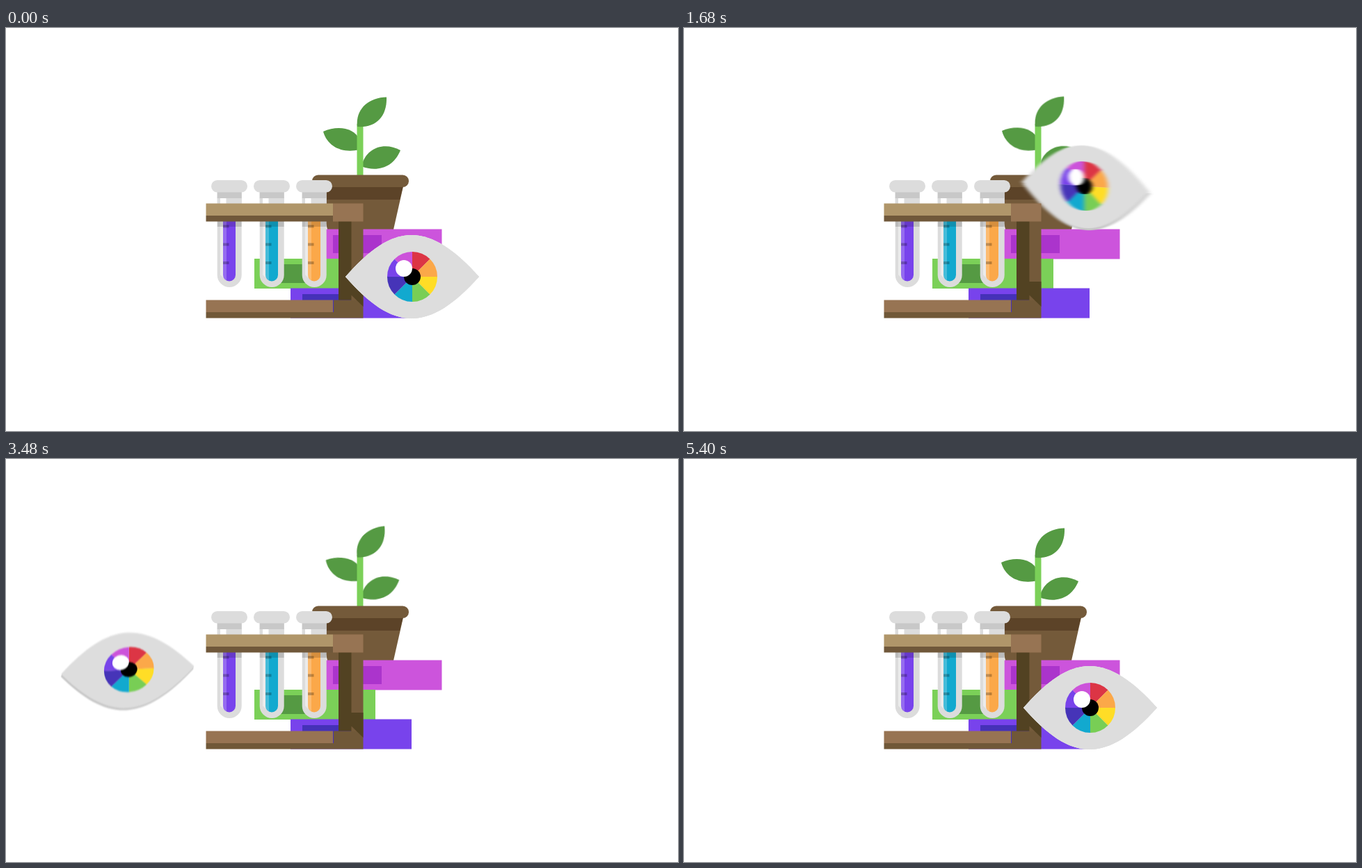
An HTML page that plays this animation: 966x580 px, repeating every 5440 ms.

```html
<!DOCTYPE html>
<html lang="en">
<head>
<meta charset="utf-8">
<title>Eye orbiting a still life</title>
<style>
  html, body { margin: 0; width: 100%; height: 100%; overflow: hidden; background: #fff; }
  svg { display: block; width: 966px; height: 580px; }

  .leaf { animation: sway 5440ms infinite cubic-bezier(.4, 0, .6, 1); }
  .top { --a: -4deg; transform-origin: 500px 142px; }
  .left { --a: 4.3deg; transform-origin: 508px 200px; }
  .right { --a: -2.3deg; transform-origin: 515px 222px; }
  @keyframes sway {
    0%, 16.5% { transform: none; }
    57% { transform: rotate(var(--a)); }
    97%, 100% { transform: none; }
  }

  .tube { transform-origin: 321px 336px; animation: nudge 5440ms infinite ease-in-out; }
  @keyframes nudge {
    0%, 34.6% { transform: none; }
    38.2% { transform: rotate(1.6deg); }
    42.3% { transform: rotate(-.6deg); }
    45.5%, 100% { transform: none; }
  }
</style>
</head>
<body>
<svg id="scene" viewBox="0 0 966 580">
  <defs>
    <filter id="motion" filterUnits="userSpaceOnUse" x="0" y="0" width="966" height="580"
            color-interpolation-filters="sRGB">
      <feGaussianBlur id="blur" stdDeviation="0 0"/>
    </filter>
    <path id="lens" d="M-96 0C-62 -39 -32 -60 -1 -60S61 -39 96 0C61 39 30 60 -1 60S-62 39 -96 0Z"/>
  </defs>

  <g fill="#559a43">
    <path class="leaf left" d="M456 149C476 140 500 143 508 160V175C484 181 462 171 456 149Z"/>
    <path class="leaf right" d="M511 199C517 172 544 163 567 176C557 201 533 208 511 199Z"/>
  </g>
  <path fill="#7bd058" d="M504.500 138h9v76h-9z"/>
  <path class="leaf top" fill="#559a43" d="M505 142C502 117 521 100 547 99.500C548 126 533 144 505 142Z"/>

  <path fill="#745a3a" d="M448 228H571L557 290H462Z"/>
  <path fill="#5c4328" d="M448 229H570.500L566 247H452Z"/>
  <rect x="440" y="211.500" width="139" height="17.500" rx="8.700" fill="#745a3a"/>

  <path fill="#cc54dc" d="M460 289.500H626.500V332.500H460Z"/>
  <path fill="#ab34cc" d="M470 298H540V324H470Z"/>
  <path fill="#7bd058" d="M357 332H531V375H357Z"/>
  <path fill="#559a43" d="M383 340H436V367H383Z"/>
  <path fill="#7843ec" d="M409 374.500H583V417.500H409Z"/>
  <path fill="#4531b8" d="M426 383H496V409H426Z"/>

  <g id="rack">
    <g id="tubes"></g>
    <path fill="#b0966a" d="M287.500 252.500H470V270H287.500Z"/>
    <path fill="#70583a" d="M287.500 270H471V278.500H287.500Z"/>
    <path fill="#705838" d="M287.500 409H471V391.500H513.500V417.500H287.500Z"/>
    <path fill="#977453" d="M287.500 391.500H470V409H287.500Z"/>
    <path fill="#745a3a" d="M496 278H513.500V392H496Z"/>
    <path fill="#524222" d="M478 278H496.500V391.500H478ZM496 365H513.500V401L496 384Z"/>
    <path fill="#977453" d="M470 252.500H513.500V278.500H470Z"/>
  </g>

  <g id="eye">
    <use id="shade" href="#lens" fill="#c6c6c6"/>
    <use id="rim" href="#lens" fill="#ececec"/>
    <use id="white" href="#lens" fill="#dddddd"/>
    <g id="iris"></g>
  </g>
</svg>

<script>
const LOOP = 5440, SHUTTER = 40;
const [scene, rack, tubes, eye, shade, rim, white, iris, blur] =
  ['scene', 'rack', 'tubes', 'eye', 'shade', 'rim', 'white', 'iris', 'blur']
    .map(id => document.getElementById(id));

const SPACING = 61, TUBE_DELAY = 185;
tubes.innerHTML = ['#7843ec', '#12a9cf', '#fba849'].map((color, i) => `
  <g transform="translate(${i * SPACING} 0)">
  <g class="tube" style="animation-delay:${(2 - i) * TUBE_DELAY}ms">
    <path fill="#dcdcdc" d="M303.700 236H338.700V355.500A17.500 17.500 0 0 1 303.700 355.500Z"/>
    <path fill="#ebebeb" d="M308 278h4.500v82l-4.500 -5z"/>
    <path fill="${color}" d="M312 270H330V355.500A9 9 0 0 1 312 355.500Z"/>
    <path fill="#fff" fill-opacity=".22" d="M312 278h5V363A9 9 0 0 1 312 355.500Z"/>
    <path fill="#000" fill-opacity=".25" d="M312 283.500h8.500v4h-8.500zm0 26h8.500v4h-8.500zm0 26.500h8.500v4h-8.500z"/>
    <path fill="#000" fill-opacity=".15" d="M303.700 270H338.700V286H303.700Z"/>
    <path fill="#dcdcdc" d="M303.700 244H338.700V262H303.700Z"/>
    <path fill="#fff" d="M308 244h8.500v18h-8.500z"/>
    <path fill="#c8c8c8" d="M303.700 234H338.700V245H303.700Z"/>
    <rect x="295" y="219" width="52" height="17.500" rx="8.700" fill="#dcdcdc"/>
  </g></g>`).join('');

// Iris: equal sectors clockwise from the top, then pupil and glint
const wheel = ['#dc3545', '#fba849', '#ffdd26', '#78ce55', '#12a9cf', '#4634b8', '#7843ea', '#cc53da'];
const sector = 36 * Math.SQRT1_2;
iris.innerHTML = wheel.map((color, i) =>
  `<path fill="${color}" transform="rotate(${i * 45})" d="M0 0V-36A36 36 0 0 1 ${sector} ${-sector}Z"/>`
).join('') + '<circle r="12"/><circle cx="-12" cy="-12" r="12" fill="#fff"/>';

// Progress from 0 to 1 between two times; a shapes the start, b the end
function ease(t, from, to, a = 2, b = 2) {
  const u = Math.min(1, Math.max(0, (t - from) / (to - from)));
  return 1 - (1 - u ** a) ** b;
}

function place(t) {
  return {
    x: 584 + 68 * ease(t, 450, 1180) - 477 * ease(t, 1180, 3530, 2, 3.65)
      + 412 * ease(t, 3530, 4820, 3, 3.3) - 3 * ease(t, 4820, 5150),
    y: 358 - 138 * ease(t, 450, 2160, 2, 4) + 138 * ease(t, 2160, 4640, 1.5, 1.87)
  };
}

function drawEye(t) {
  const { x, y } = place(t);
  const height = (358 - y) / 138;
  // The eye turns towards the middle of the scene as it rises
  const skew = 5.6e-4 * (x - 435) * height;
  const depth = Math.min(3, 50 * Math.abs(skew));
  const sx = 1 - .06 * height ** 3;
  const sy = 1 - .1 * ease(t, 1240, 2880) + .1 * ease(t, 4200, 4700);

  const put = (part, dx, dy) => part.setAttribute('transform',
    `matrix(${sx} ${skew * sx} 0 ${sy} ${x + dx} ${y + depth / 2 + dy})`);
  put(shade, 14 * skew, depth);
  put(rim, 0, -depth / 3);
  put(white, 0, 0);
  put(iris, -30 * skew, -depth / 2);
}

function blurEye(t) {
  const a = place(t - SHUTTER / 2), b = place(t + SHUTTER / 2);
  const vx = Math.abs(b.x - a.x), vy = Math.abs(b.y - a.y);
  const spread = Math.sqrt(12); // width of an even smear per standard deviation
  blur.setAttribute('stdDeviation', `${vx / spread} ${vy / spread}`);
  if (Math.hypot(vx, vy) > 1) eye.setAttribute('filter', 'url(#motion)');
  else eye.removeAttribute('filter');
}

function frame() {
  const t = performance.now() % LOOP;
  drawEye(t);
  blurEye(t);
  // The upper half of the orbit runs behind the rack
  const next = t > 1240 && t < 3480 ? rack : null;
  if (eye.nextElementSibling !== next) scene.insertBefore(eye, next);
  requestAnimationFrame(frame);
}
frame();
</script>
</body>
</html>
```
